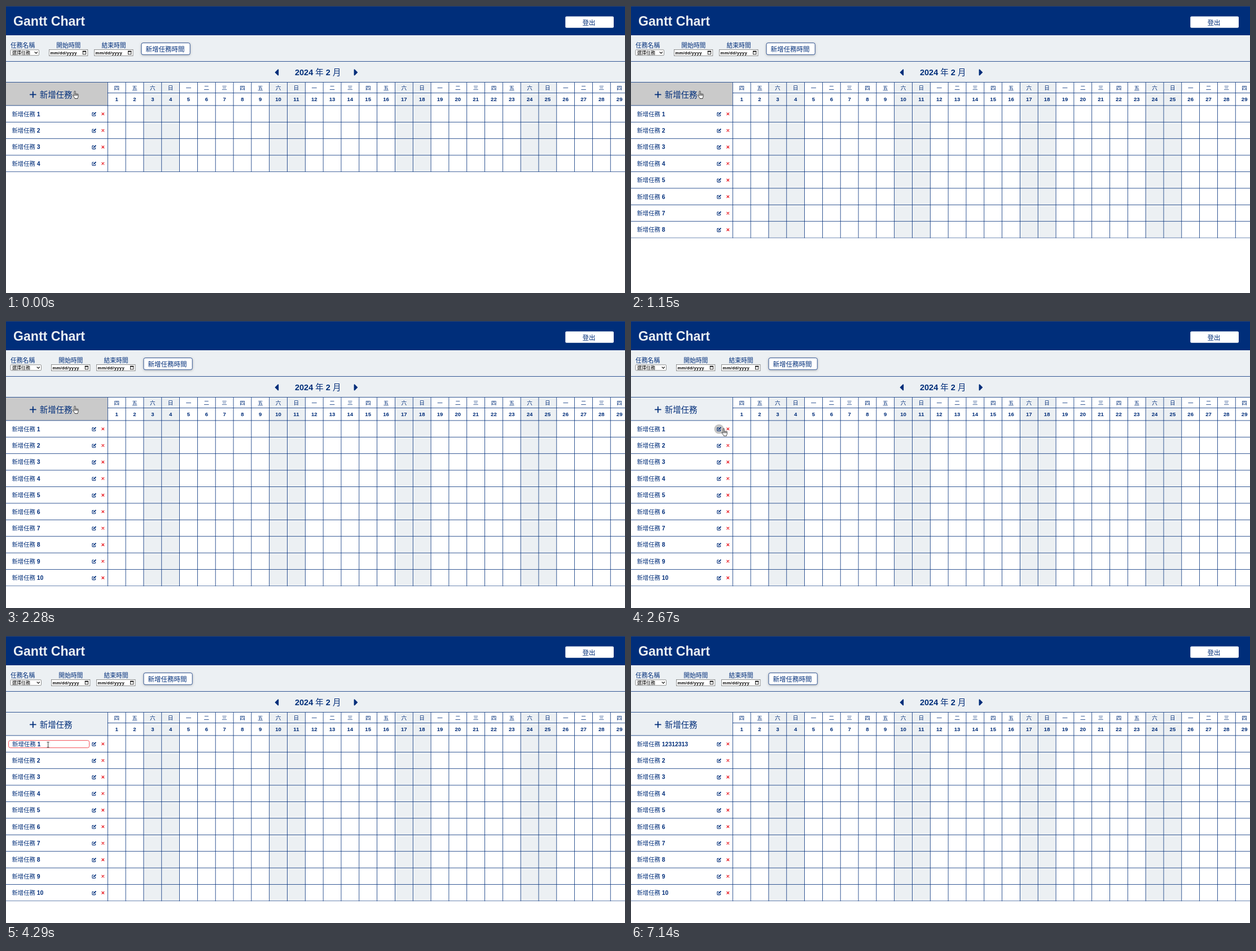
Animation of 1097x510 px, one loop 7.42 s. Source, as an HTML page:

```html
<!DOCTYPE html>
<html lang="zh-Hant">
<head>
<meta charset="utf-8">
<title>Gantt Chart</title>
<style>
  html, body { margin: 0; width: 100%; height: 100%; overflow: hidden; background: #fff; }
  svg { display: block; width: 1097px; height: 510px; }
  text { font-family: "Liberation Sans", "Noto Sans CJK TC", "Noto Sans CJK SC", "Noto Sans CJK JP", "Noto Sans CJK", sans-serif; fill: #002e7a; white-space: pre; }
  .bold { font-weight: 700; }
  .black { fill: #000; }
  .control { fill: #fff; stroke: #767676; stroke-width: .8; }
  .shadow { filter: drop-shadow(0 1px 2px rgba(0, 0, 0, .25)); }
  .pointer { fill: #fff; stroke: #111; stroke-width: .8; stroke-linejoin: round; }
</style>
</head>
<body>
<svg id="stage" viewBox="0 0 1097 510" xmlns="http://www.w3.org/2000/svg"></svg>
<script>
const NAVY = '#002e7a', PALE = '#ecf0f3', GRAY = '#cacaca';
const LOOP = 7420, COL = 31.82, ROW = 29.4, LEFT = 179.9, TOP = 176.5, RULE = .8, MAX_ROWS = 10;
const DIGIT = 10.4 * .556;
const stage = document.getElementById('stage');

function add(tag, attrs, parent = stage) {
  const el = document.createElementNS('http://www.w3.org/2000/svg', tag);
  for (const key in attrs) el.setAttribute(key, attrs[key]);
  return parent.appendChild(el);
}
const box = (x, y, width, height, fill, parent, more) =>
  add('rect', { x, y, width, height, fill, ...more }, parent);
const group = parent => add('g', {}, parent);
const line = (d, stroke, width, parent) =>
  add('path', { d, stroke, 'stroke-width': width, fill: 'none', 'stroke-linecap': 'round', 'stroke-linejoin': 'round' }, parent);
const rule = (x, y) => box(x, y, 1097 - x, RULE, NAVY);
const show = (el, on) => el.setAttribute('display', on ? 'inline' : 'none');
const move = (el, x, y) => el.setAttribute('transform', `translate(${x} ${y})`);

// Latin runs are bold, Chinese runs regular.
function write(el, str) {
  el.textContent = '';
  for (const run of str.match(/[\w\/ ]+|[^\w\/ ]+/g) || [])
    add('tspan', { class: /\w/.test(run) ? 'bold' : '' }, el).textContent = run;
}
function label(str, x, y, size, parent, more) {
  const el = add('text', { x, y, 'font-size': size, ...more }, parent);
  write(el, str);
  return el;
}
const centered = (str, x, y, size, parent) => label(str, x, y, size, parent, { 'text-anchor': 'middle' });

// Header
box(0, 0, 1097, 52, NAVY);
box(0, 0, 1097, RULE, '#3b4b66');
label('Gantt Chart', 13, 34.5, 23.1, stage, { style: 'fill:' + PALE });
box(991.3, 18.5, 85.7, 20.2, '#fff', stage, { rx: 2 });
centered('登出', 1033, 33.8, 11.5);

// Toolbar
box(0, 52, 1097, 125, PALE);
label('任務名稱', 8, 74, 10.8);
const select = box(8, 77.8, 50.5, 10, '#fff', stage, { class: 'control', rx: 1.5 });
label('選擇任務', 11, 85.9, 8, stage, { class: 'black' });
const chevron = line('M51 81.8l2.3 2.3 2.3-2.3', '#000', 1.1);
const tools = group();
for (const [title, x] of [['開始時間', 76.4], ['結束時間', 156.6]]) {
  centered(title, x + 34.4, 74, 10.8, tools);
  box(x, 77.4, 68.4, 11.2, '#fff', tools, { class: 'control' });
  label('mm/dd/yyyy', x + 2, 85.6, 7.6, tools, { class: 'black', 'letter-spacing': .35 });
  box(x + 59.8, 80.3, 5.4, 5.6, 'none', tools, { stroke: '#000', 'stroke-width': .8 });
  box(x + 59.4, 79.8, 6.2, 1.7, '#000', tools);
}
box(240, 65.6, 86.2, 21, '#fff', tools, { class: 'shadow', stroke: NAVY, 'stroke-width': RULE, rx: 3 });
label('新增任務時間', 247.5, 80.9, 11.5, tools);

// Month bar
centered('2024 年 2 月', 552.7, 123.2, 14.5);
for (const d of ['M482.4 113.2v9.6l-5-4.8z', 'M617.4 113.2v9.6l5-4.8z'])
  add('path', { d, fill: NAVY, stroke: NAVY, 'stroke-width': 1.6, 'stroke-linejoin': 'round' });

// Calendar grid
box(LEFT, 136, 918, 374, '#fff');
box(0, TOP, LEFT, 334, '#fff');
for (let i = 0; i < 29; i++) {
  const x = LEFT + i * COL, mid = x + COL / 2 + .4;
  if (i % 7 === 2 || i % 7 === 3) box(x, 136, COL, 374, PALE);
  centered('四五六日一二三'[i % 7], mid, 148.7, 9.6);
  centered(String(i + 1), mid, 169, 9.6);
}
const addCell = box(0, 136, LEFT, 41, PALE);
for (let i = 0; i < 29; i++) box(LEFT + i * COL, 136, RULE, 374, NAVY);
rule(0, 98.1);
rule(0, 135.2);
rule(LEFT, 154.1);
for (let i = 0; i <= MAX_ROWS; i++) rule(0, TOP + i * ROW);
line('M42.8 157.4h10M47.8 152.4v10', NAVY, 1.8);
label('新增任務', 59.8, 162.8, 14.4);

// Task rows
const spot = add('circle', { cy: 192, r: 8.6, fill: '#c4c4c4' });
const field = box(4.6, 185.6, 143, 13, '#fff', stage, { rx: 3, stroke: '#f0222c', 'stroke-width': RULE });
const names = [];
for (let i = 0; i < MAX_ROWS; i++) {
  const row = group();
  move(row, 0, i * ROW);
  names.push(label('新增任務 ' + (i + 1), 10.4, 195.6, 10.4, row));
  line('M155.2 189.6h-1.4q-.9 0-.9.9v3.9q0 .9.9.9h3.9q.9 0 .9-.9v-1.4', NAVY, 1.1, row);
  line('M155.6 192.6l3.2-3.2', NAVY, 1.9, row);
  line('M169.9 189.9l3.8 3.8M173.7 189.9l-3.8 3.8', '#e8141c', 1.2, row);
}
const caret = box(0, 187, RULE, 11, '#111');
const page = box(0, 0, 1097, 510, '#fff');

// Pointers
const pointers = { hand: group(), beam: group(), arrow: group() };
add('path', { class: 'pointer', d: 'M3 9V1.6a1 1 0 0 1 2 0V6a.9.9 0 0 1 1.7 0 .9.9 0 0 1 1.7.3A.8.8 0 0 1 10 7v3.2q0 1.5-1 2.3v1.4H4v-1Q2 10.6.6 8.8.2 7.6 1.5 7.6 2.3 8 3 9zM5 6v3M6.7 6.2V9M8.4 6.5V9' }, pointers.hand);
line('M.6.5h1l.6.5.6-.5h1M2.2 1v8.4M.6 9.9h1l.6-.5.6.5h1', '#222', .9, pointers.beam);
add('path', { class: 'pointer', d: 'M.5.6v9.6l2.2-2 1.4 3.1 1.5-.7-1.4-3h3z' }, pointers.arrow);

// Each step lists only what changes at that time.
const steps = [
  [0, { rows: 4, hover: 'add', task: '1', edit: false, caret: false, pointer: ['hand', 118, 150.6] }],
  [150, { rows: 5 }],
  [580, { rows: 6 }],
  [870, { rows: 7 }],
  [1150, { rows: 8 }],
  [1710, { rows: 9 }],
  [2280, { rows: 10 }],
  [2430, { pointer: ['hand', 130, 160] }],
  [2550, { pointer: ['hand', 147, 181], hover: '' }],
  [2670, { pointer: ['hand', 160.3, 190.3], hover: 'edit' }],
  [2820, { pointer: ['hand', 166, 190.3], hover: 'delete' }],
  [2940, { pointer: ['hand', 155, 190.3], hover: 'edit' }],
  [3090, { edit: true }],
  [3210, { pointer: ['beam', 86.8, 187], hover: '' }],
  [3350, { pointer: ['beam', 72, 187] }],
  [3610, { pointer: ['beam', 72.4, 188] }],
  [3730, { caret: true }],
  [4290, { caret: false }],
  [4740, { caret: true }],
  [4870, { task: '' }],
  [4990, { task: '1' }],
  [5140, { task: '123' }],
  [5540, { task: '1231' }],
  [5690, { task: '1231231' }],
  [5840, { task: '12312313' }],
  [6270, { edit: false, pointer: ['arrow', 582, 280] }],
  [6420, { caret: false, pointer: ['arrow', 612.5, 280] }],
  [6570, { pointer: ['arrow', 625.5, 280] }],
  [6720, { pointer: ['arrow', 800, 325] }],
  [6840, { pointer: ['arrow', 958, 393] }],
  [6990, { pointer: ['arrow', 1022, 478] }],
  [7140, { pointer: [] }]
];

function render(s) {
  page.setAttribute('y', TOP + s.rows * ROW + RULE);
  const shift = s.rows === MAX_ROWS ? 4 : 0;
  select.setAttribute('width', 50.5 + shift);
  move(chevron, shift, 0);
  move(tools, shift, 0);
  addCell.setAttribute('fill', s.hover === 'add' ? GRAY : PALE);
  show(spot, s.hover === 'edit' || s.hover === 'delete');
  spot.setAttribute('cx', s.hover === 'delete' ? 172 : 156);
  show(field, s.edit);
  write(names[0], '新增任務 ' + s.task);
  names[0].setAttribute('x', s.edit ? 11 : 10.4);
  show(caret, s.caret);
  caret.setAttribute('x', Math.floor(55.6 + s.task.length * DIGIT));
  const [kind, x, y] = s.pointer;
  for (const name in pointers) show(pointers[name], name === kind);
  if (kind) move(pointers[kind], x, y);
}

const start = performance.now();
let shown = 0;
function frame() {
  const time = (performance.now() - start) % LOOP;
  const past = steps.filter(([at]) => at <= time);
  if (past.length !== shown) {
    shown = past.length;
    render(Object.assign({}, ...past.map(step => step[1])));
  }
  requestAnimationFrame(frame);
}
frame();
</script>
</body>
</html>
```
